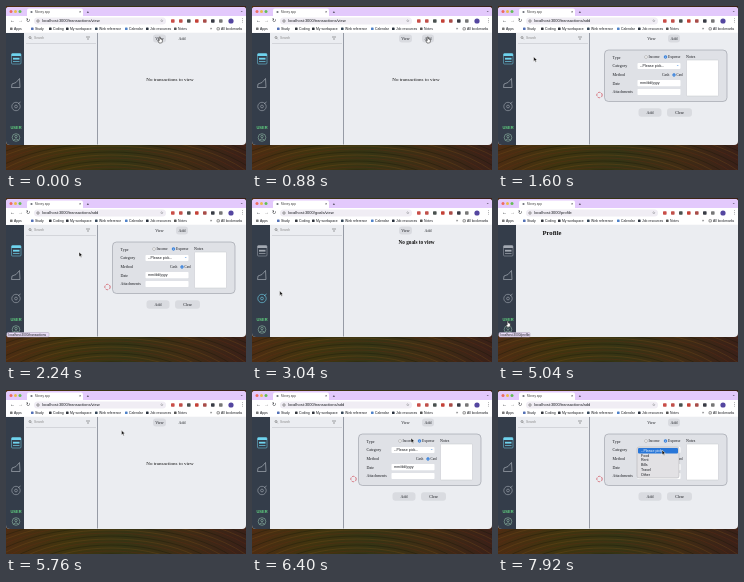
An HTML page with a canvas for the animation above (8000 ms loop, 240 by 164 pixels).

```html
<!DOCTYPE html>
<html lang="en">
<head>
<meta charset="utf-8">
<title>Money tracker</title>
<style>
html, body { margin: 0; width: 100%; height: 100%; overflow: hidden; background: #2b2112; }
canvas { display: block; width: 240px; height: 164px; }
</style>
</head>
<body>
<canvas id="stage" width="240" height="164"></canvas>
<script>
const c = document.getElementById('stage').getContext('2d');
const LOOP = 8000;
const SANS = '"Liberation Sans", Arial, sans-serif';
const SERIF = '"Liberation Serif", Times, serif';
const INK = '#16181d', SIDE = '#343d4a', PAGE = '#ebedf1', CYAN = '#6fd3ee', BLUE = '#2876d8';

function box(x, y, w, h, fill, r = 0, stroke) {
  c.beginPath();
  c.roundRect(x, y, w, h, r);
  if (fill) { c.fillStyle = fill; c.fill(); }
  if (stroke) { c.strokeStyle = stroke; c.lineWidth = .5; c.stroke(); }
}

function dot(x, y, r, fill, stroke, width = .7) {
  c.beginPath();
  c.arc(x, y, r, 0, Math.PI * 2);
  if (fill) { c.fillStyle = fill; c.fill(); }
  if (stroke) { c.strokeStyle = stroke; c.lineWidth = width; c.stroke(); }
}

function line(points, color, width = .7) {
  c.beginPath();
  points.forEach(p => c.lineTo(...p));
  c.strokeStyle = color;
  c.lineWidth = width;
  c.stroke();
}

function text(s, x, y, size = 4, color = INK, font = SANS, align = 'left', weight = '') {
  c.font = `${weight} ${size}px ${font}`;
  c.fillStyle = color;
  c.textAlign = align;
  c.textBaseline = 'middle';
  c.fillText(s, x, y);
}

function wallpaper() {
  const g = c.createLinearGradient(0, 0, 240, 0);
  ['#4c2c12', '#40340f', '#363414', '#402c14', '#3a2018']
    .forEach((color, i) => g.addColorStop(i / 4, color));
  box(0, 0, 240, 164, g);
  c.save();
  c.globalAlpha = .3;
  for (let i = 0; i < 26; i++) {
    c.beginPath();
    c.ellipse(105, 205, 35 + i * 7, 20 + i * 3, 0, Math.PI, Math.PI * 2);
    c.strokeStyle = ['#7d551c', '#101408', '#6a2c14'][i % 3];
    c.lineWidth = 1;
    c.stroke();
  }
  c.restore();
}

function browser(url) {
  box(0, 1, 240, 138, PAGE, [3, 3, 4, 4]);
  box(0, 1, 240, 9.5, '#e3c9fc', [3, 3, 0, 0]);
  ['#ee6b60', '#e9bc4b', '#63bd56'].forEach((color, i) => dot(5 + i * 4.5, 5.5, 1.5, color));
  box(21, 2.5, 56, 8, '#fff', [2, 2, 0, 0]);
  dot(25.5, 6, 1.1, '#6c7079');
  text('Money app', 29, 6, 3, '#444');
  text('×', 73, 6, 4);
  text('+', 82, 6, 4, INK, SANS, 'center', 'bold');
  text('⌄', 234, 5, 4);

  box(0, 10, 240, 16.8, '#fff');
  text('←', 4, 15, 5);
  text('→', 12, 15, 5, '#888');
  text('↻', 20, 15, 5);
  box(28, 11.5, 132, 7, '#f0edf4', 3.5);
  dot(32, 15, 1.2, null, '#555', .6);
  text(url, 36, 15, 4);
  text('☆', 154, 15, 4);
  ['#c94e48', '#c0504a', '#49514f', '#c44137', '#a84c48', '#393c45', '#777']
    .forEach((color, i) => box(165 + i * 8, 13.2, 3.6, 3.6, color, .7));
  dot(225, 15, 2.6, '#5446a0');
  text('⋮', 234, 15, 5);

  const marks = [
    [4, '#777', 'Apps'], [25, '#5270b5', 'Study'],
    [43, '#35383e', 'Coding'], [60, '#30343c', 'My workspace'],
    [89, '#354759', 'Web reference'], [119, '#4e81c8', 'Calendar'],
    [140, '#29313d', 'Job resources'], [168, '#555', 'Notes']
  ];
  marks.forEach(([x, color, label]) => {
    box(x, 21.5, 2.6, 2.6, color, .6);
    text(label, x + 4, 23, 3.4);
  });
  text('»', 204, 23, 4);
  box(211, 21.7, 2.4, 2.2, null, .3, '#333');
  text('All bookmarks', 215, 23, 3.4);
}

function sidebar(active) {
  box(0, 27, 18, 112, SIDE, [0, 0, 0, 4]);
  const tone = name => active === name ? CYAN : '#a3a9b2';
  let color = tone('money');
  box(5.5, 47.5, 9.5, 10.5, null, 1, color);
  box(5.5, 47.5, 9.5, 2.5, color, [1, 1, 0, 0]);
  box(7, 51.8, 6.5, 1.8, color);
  line([[7, 55.5], [13.5, 55.5]], color);

  color = tone('budget');
  line([[5.5, 81.5], [6, 78], [10, 76.5], [13.5, 72.5], [14, 81.5], [5.5, 81.5]], color);

  color = tone('goals');
  dot(10, 100.5, 4.2, null, color, .6);
  dot(10, 100.5, 1.4, null, color, .6);
  line([[12, 98], [14.5, 96]], color);

  text('USER', 10, 121.5, 4, '#61d582', SANS, 'center', 'bold');
  dot(10, 131.5, 3.8, null, '#8fb9a4', .6);
  dot(10, 130.5, 1.2, null, '#8fb9a4', .6);
  line([[7.5, 134], [10, 132.8], [12.5, 134]], '#8fb9a4', .6);
}

function pill(label, x, y, w, on, h = 8) {
  if (on) box(x - w / 2, y - h / 2, w, h, '#d9dbe0', 3);
  text(label, x, y, 4, INK, SERIF, 'center');
}

function lists(active, hover) {
  dot(24, 31.5, 1, null, '#555', .5);
  line([[24.8, 32.3], [25.8, 33.3]], '#555', .5);
  text('Search', 28, 32, 3.2, '#888');
  line([[80, 31], [84, 31]], '#444', .5);
  line([[81, 33], [83, 33]], '#444', .5);
  line([[20, 37.5], [90, 37.5]], '#c3c6cc', .6);
  line([[91.5, 27], [91.5, 138.5]], '#8d929c', .9);
  pill('View', 153.5, 32.5, 13, active === 'view' || hover === 'view');
  pill('Add', 176, 32.5, 12, active === 'add' || hover === 'add');
}

function radio(x, y, on) {
  dot(x, y, 1.4, on ? BLUE : '#fff', on ? BLUE : '#777', .4);
  if (on) dot(x, y, .5, '#fff');
}

function form(open) {
  box(106.5, 44, 122.5, 51.5, '#dfe1e6', 4, '#868b94');
  ['Type', 'Category', 'Method', 'Date', 'Attachments']
    .forEach((s, i) => text(s, 114.5, 51.5 + i * 8.7, 4, INK, SERIF));
  radio(148, 51, false);
  text('Income', 150.5, 51.3, 3.7, INK, SERIF);
  radio(167.5, 51, true);
  text('Expense', 170, 51.3, 3.7, INK, SERIF);
  text('Notes', 188, 51, 4, INK, SERIF);
  box(188.5, 54, 32, 36, '#fff', .7, '#c2c4ca');
  box(139.5, 57, 43, 6, '#fff', 1);
  text('--Please pick--', 142, 60, 3.7);
  text('⌄', 178, 59, 4, BLUE);
  text('Cash', 164, 69, 3.7, INK, SERIF);
  radio(176, 69, true);
  text('Card', 178.5, 69, 3.2, INK, SERIF);
  box(139.5, 74, 43, 6.3, '#fff', .7);
  text('mm/dd/yyyy', 142, 77.3, 3.7);
  box(139.5, 83, 43, 6, '#fff', .7);
  c.setLineDash([2.6, 1]);
  dot(101.5, 89, 2.7, null, '#d0525e', .8);
  c.setLineDash([]);
  pill('Add', 152, 106.5, 23, true, 8.5);
  pill('Clear', 181.5, 106.5, 25, true, 8.5);

  if (open) {
    box(139, 57, 42, 31, '#e2e1e4', 2, '#a9a9ae');
    box(140, 58, 40, 5.5, BLUE, 1);
    ['--Please pick--', 'Food', 'Rent', 'Bills', 'Travel', 'Other']
      .forEach((s, i) => text(s, 143, 60.8 + i * 4.8, 3.6, i ? INK : '#fff'));
  }
}

// Each view begins at its time.
const views = [
  [0, 'money', 'view'], [1040, 'money', 'add'],
  [2880, 'goals', 'view'], [3440, 'goals', 'add'],
  [4240, 'profile', ''], [5520, 'money', 'view'],
  [5960, 'money', 'add']
];

const path = [
  [0, 154, 33], [320, 155, 33], [800, 176, 33], [1120, 176, 33],
  [1760, 10, 54], [1960, 10, 54], [2240, 73, 54], [2720, 10, 100],
  [2960, 10, 100], [3360, 176, 33], [3480, 176, 33], [3800, 10, 129],
  [4160, 10, 125], [5120, 10, 125], [5440, 10, 53], [5560, 10, 53],
  [5900, 176, 33], [6020, 176, 33], [6400, 159, 48], [6800, 164, 60],
  [8000, 164, 60]
];

function pointer(t) {
  const i = path.findLastIndex(p => p[0] <= t);
  const a = path[i], b = path[i + 1] || a;
  let u = (t - a[0]) / (b[0] - a[0] || 1);
  u = u * u * (3 - 2 * u);
  return [a[1] + (b[1] - a[1]) * u, a[2] + (b[2] - a[2]) * u];
}

function cursor(x, y, hand) {
  c.save();
  c.translate(x, y);
  const p = hand
    ? [[-.8, -2], [.3, -2], [.5, 0], [2.4, .6], [2.3, 3], [1.5, 4], [-1, 4], [-2.3, 1.5], [-.8, 1.9]]
    : [[0, 0], [0, 4.8], [1.1, 3.8], [2, 5.5], [2.8, 5.1], [2, 3.5], [3.5, 3.3]];
  c.beginPath();
  p.forEach(q => c.lineTo(...q));
  c.closePath();
  c.fillStyle = hand ? '#fff' : '#111';
  c.fill();
  c.strokeStyle = hand ? '#111' : '#fff';
  c.lineWidth = .5;
  c.stroke();
  c.restore();
}

function draw(t) {
  const [, page, tab] = views.findLast(v => v[0] <= t);
  const [x, y] = pointer(t);
  const onTabs = page !== 'profile' && y > 28 && y < 37;
  const hover = onTabs && x > 147 && x < 160 ? 'view' : onTabs && x > 169 && x < 183 ? 'add' : '';
  const route = page === 'money' ? 'transactions/' : page === 'goals' ? 'goals/' : 'profile';

  wallpaper();
  browser('localhost:3000/' + route + tab);
  sidebar(page);
  if (page === 'profile') {
    text('Profile', 44.5, 35.5, 6.6, '#111', SERIF, 'left', 'bold');
  } else {
    lists(tab, hover);
    if (page === 'goals') {
      text(tab === 'add' ? 'Add Goals' : 'No goals to view', 164.5, 44.5, 5.2, '#111', SERIF, 'center', 'bold');
    } else if (tab === 'view') {
      text('No transactions to view', 164, 73.5, 5, '#111', SERIF, 'center');
    } else {
      form(t >= 6960);
    }
  }

  const lingering = t >= 1700 && t < 2400;
  if (x < 18 || lingering) {
    const link = lingering || y < 65 ? 'transactions' : y < 112 ? 'goals' : 'profile';
    box(1, 134.5, link === 'transactions' ? 42 : 31, 4.5, '#e9dcf6', 1, '#aaa0b8');
    text('localhost:3000/' + link, 2.5, 137, 3.1);
  }
  cursor(x, y, x < 18 || !!hover);
}

function tick(now) {
  draw(now % LOOP);
  requestAnimationFrame(tick);
}
draw(0);
requestAnimationFrame(tick);
</script>
</body>
</html>
```
